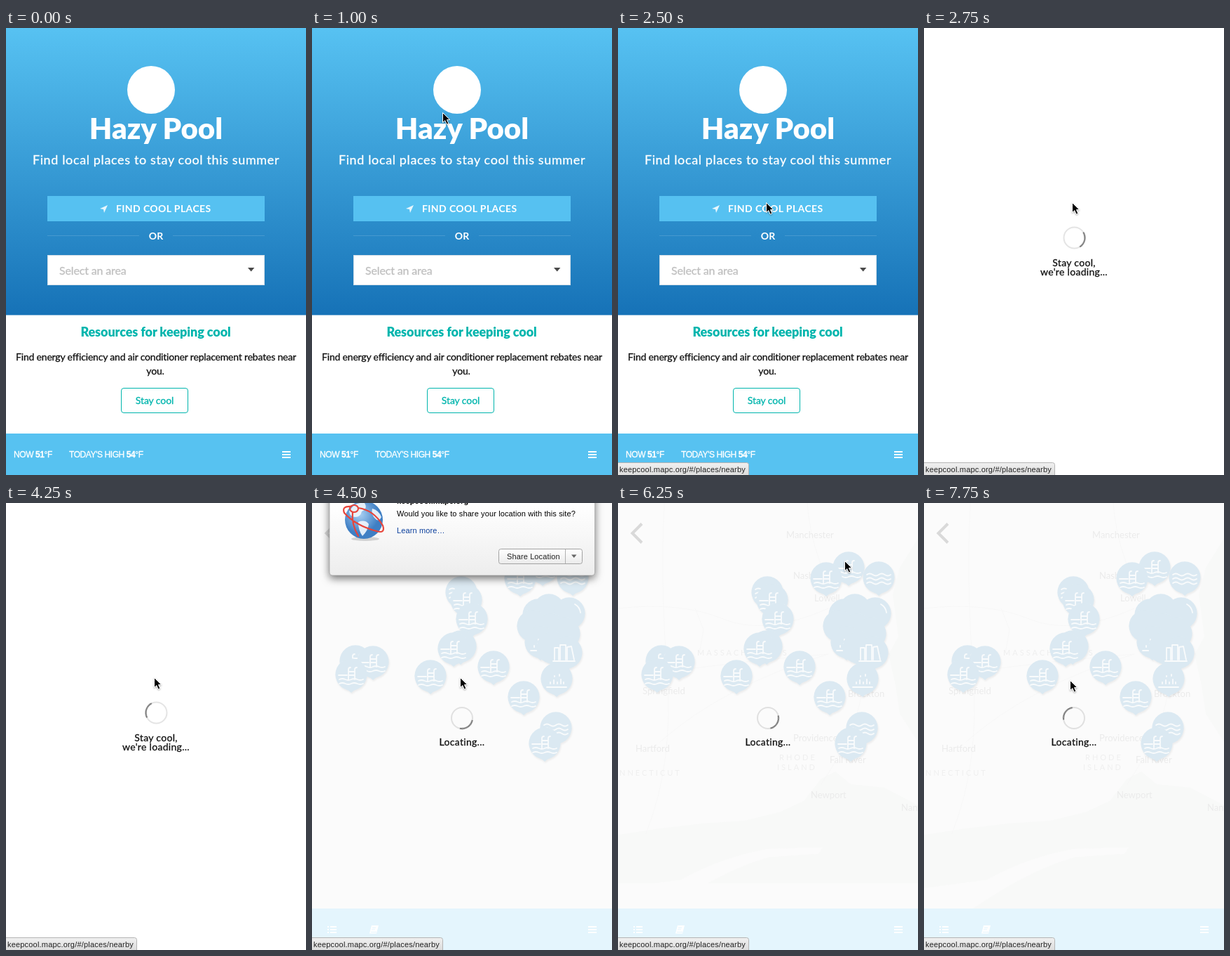
Animation, 428 px wide and 636 px high, one loop 8000 ms. Source, as an HTML page:

```html
<!DOCTYPE html>
<html lang="en">
<head>
<meta charset="utf-8">
<title>Cool places</title>
<style>
html, body { margin: 0; width: 100%; height: 100%; overflow: hidden; background: #fff; }
svg { display: block; width: 428px; height: 636px; font: 14px Lato, "Open Sans", sans-serif; }
.mid { text-anchor: middle; }
.bold { font-weight: 700; }
.black { font-weight: 900; }
.white { fill: #fff; stroke: #fff; }
.teal { fill: #00b5ad; stroke: #00b5ad; }
.ink { fill: #111; stroke: #111; }
.pale { fill: #bfbfbf; stroke: #bfbfbf; }
.thick { stroke-width: .3px; }
.ui { font-family: "Liberation Sans", Arial, sans-serif; font-size: 11px; letter-spacing: .12px; }
.temp { font-family: "Liberation Sans", Arial, sans-serif; font-size: 12px; letter-spacing: -.42px; }
.line { fill: none; stroke-linecap: round; stroke-linejoin: round; }
.place { font-size: 13px; fill: #ebebeb; }
.state { font-size: 11px; letter-spacing: 3px; fill: #efefef; }
.wait { letter-spacing: .3px; }

.home, .loading, .locating, .prompt, .status, .tiles, .strip, .cursor {
  animation: home 8s step-end -20ms infinite;
}
.loading { animation-name: loading; }
.locating { animation-name: locating; }
.prompt { animation-name: prompt; }
.status { animation-name: status; }
.tiles { animation-name: tiles; }
.strip { animation-name: strip; }
.cursor { animation-name: cursor; }
.arc { animation: spin 8s steps(32) -20ms infinite; }

@keyframes home { 0% { opacity: 1 } 34.375%, 100% { opacity: 0 } }
@keyframes loading { 0% { opacity: 0 } 34.375% { opacity: 1 } 56.25%, 100% { opacity: 0 } }
@keyframes locating { 0% { opacity: 0 } 56.25%, 100% { opacity: 1 } }
@keyframes prompt { 0% { opacity: 1 } 71.875%, 100% { opacity: 0 } }
@keyframes status { 0% { opacity: 0 } 31.25%, 100% { opacity: 1 } }
@keyframes tiles { 0% { opacity: 0 } 71.875% { opacity: .5 } 75% { opacity: .8 } 78.125%, 100% { opacity: 1 } }
@keyframes strip { 0% { opacity: 1 } 87.5%, 100% { opacity: 0 } }
@keyframes spin { from { transform: rotate(var(--a)) } to { transform: rotate(calc(var(--a) + 4824deg)) } }
@keyframes cursor {
  0% { transform: translate(-40px, 0) }
  9.375% { transform: translate(163px, 57px) }
  12.5% { transform: translate(186px, 120px) }
  15.625% { transform: translate(212px, 190px) }
  18.75% { transform: translate(229px, 252px) }
  25% { transform: translate(216px, 239px) }
  28.125% { transform: translate(212px, 246px) }
  31.25% { transform: translate(211px, 248px) }
  59.375% { transform: translate(220px, 232px) }
  62.5% { transform: translate(262px, 160px) }
  65.625% { transform: translate(305px, 95px) }
  68.75% { transform: translate(320px, 84px) }
  71.875% { transform: translate(323px, 82px) }
  84.375% { transform: translate(310px, 110px) }
  87.5% { transform: translate(270px, 180px) }
  90.625% { transform: translate(225px, 240px) }
  93.75% { transform: translate(210px, 250px) }
  96.875%, 100% { transform: translate(208px, 252px) }
}
</style>
</head>
<body>
<svg viewBox="0 0 428 636">
  <defs>
    <linearGradient id="sky" x2="0" y2="1"><stop stop-color="#57c2f2"/><stop offset="1" stop-color="#1672b7"/></linearGradient>
    <linearGradient id="sheet" x2="0" y2="1"><stop offset=".3" stop-color="#fff"/><stop offset="1" stop-color="#ededed"/></linearGradient>
    <linearGradient id="key" x2="0" y2="1"><stop stop-color="#fff"/><stop offset="1" stop-color="#ebebeb"/></linearGradient>
    <linearGradient id="tip" x2="0" y2="1"><stop stop-color="#f0f0f0"/><stop offset="1" stop-color="#dcdcdc"/></linearGradient>
    <radialGradient id="sea" cx=".4" cy=".35"><stop stop-color="#a9d0f3"/><stop offset="1" stop-color="#3f7fc4"/></radialGradient>
    <path id="menu" d="M394 602h12v2h-12zM394 606h12v2h-12zM394 610h12v2h-12z" fill="#fff"/>
    <path id="pin" d="M-10 20.2A22.6 22.6 0 1 1 10 20.2Q4 22 0 26Q-4 22-10 20.2Z" fill="#dbe9f2"/>
  </defs>

  <g class="home">
    <rect width="428" height="636" fill="#fff"/>
    <rect width="428" height="408.500" fill="url(#sky)"/>
    <circle cx="207" cy="88" r="34" fill="#fff"/>
    <g fill="#fff" class="mid">
      <text x="214" y="158" class="black" font-size="42">Hazy Pool</text>
      <text x="214" y="194" font-size="18" letter-spacing=".63" class="white thick">Find local places to stay cool this summer</text>
    </g>
    <rect x="59" y="239" width="310" height="36" fill="#56c1f1"/>
    <path d="M145 252l-5 11-1-5-5-1z" fill="#fff" opacity=".85"/>
    <text x="157" y="262" class="bold" letter-spacing=".4" fill="#fff">FIND COOL PLACES</text>
    <path d="M59 295.5H190M238 295.5H369" stroke="#fff" stroke-opacity=".14"/>
    <text x="214" y="301" class="mid bold" fill="#fff">OR</text>
    <rect x="59.5" y="323.5" width="309" height="42" fill="#fff" stroke="#d5dfe7"/>
    <text x="76" y="351" font-size="16" letter-spacing="-.15" class="pale thick">Select an area</text>
    <path d="M345 341h9.4l-4.7 5.4z" fill="#4a4a4a"/>

    <text x="213.5" y="439" class="mid black" font-size="18" letter-spacing="-.1" fill="#00b5ad">Resources for keeping cool</text>
    <g class="mid ink thick" letter-spacing="-.19">
      <text x="214" y="473">Find energy efficiency and air conditioner replacement rebates near</text>
      <text x="213" y="493">you.</text>
    </g>
    <rect x="164.5" y="512.5" width="95" height="35" rx="3.5" fill="none" stroke="#00b5ad"/>
    <text x="212" y="535" class="mid teal thick" letter-spacing="-.1">Stay cool</text>

    <rect y="577" width="428" height="59" fill="#57c2f1"/>
    <g class="temp white thick">
      <text x="11" y="611">NOW <tspan class="bold">51</tspan>°F</text>
      <text x="90" y="611">TODAY'S HIGH <tspan class="bold">54</tspan>°F</text>
    </g>
    <use href="#menu"/>
  </g>

  <g class="loading">
    <rect width="428" height="636" fill="#fff"/>
    <g transform="translate(214.5 298.5)" fill="none" stroke-width="2">
      <circle r="15" stroke="#e4e4e4"/>
      <circle r="15" class="arc" style="--a:110deg" stroke="#767676" stroke-dasharray="23.56 100"/>
    </g>
    <g class="mid wait ink thick">
      <text x="214" y="339">Stay cool,</text>
      <text x="214" y="352">we're loading...</text>
    </g>
  </g>

  <g class="locating">
    <rect width="428" height="636" fill="#fbfbfb"/>
    <g class="tiles">
      <path fill="#f8f9f8" d="M428 50L402 92 392 130 400 190 386 215 396 260 402 300 428 340zM0 472L60 463 120 456 180 452 230 440 265 424 290 392 310 382 332 400 380 405 428 430V577H0z"/>
      <path fill="#fbfbfb" d="M0 548L90 536Q150 503 215 492L292 490 286 499 215 504Q150 522 70 577H0z"/>
      <path class="line" stroke="#f7f7f7" d="M0 150Q90 140 150 165T300 150M66 0Q60 110 70 240T40 470M70 240Q180 225 300 215M60 340Q150 260 300 215M270 0Q275 80 330 170T290 400M110 150l12 30-6 34"/>
      <g class="place">
        <text x="240" y="50">Manchester</text>
        <text x="250" y="108">Nashua</text>
        <text x="280" y="140">Lowell</text>
        <text x="35" y="272">Springfield</text>
        <text x="328" y="276">Brockton</text>
        <text x="250" y="339">Providence</text>
        <text x="25" y="354">Hartford</text>
        <text x="302" y="370">Fall River</text>
        <text x="275" y="420">Newport</text>
        <text x="404" y="438">Nantucket</text>
      </g>
      <g class="state">
        <text x="113" y="217">MASSACHUSETTS</text>
        <text x="230" y="366">RHODE</text>
        <text x="227" y="380">ISLAND</text>
        <text x="-20" y="388">CONNECTICUT</text>
      </g>
      <rect class="strip" y="541" width="428" height="36" fill="#fbfbfb"/>
    </g>
    <g id="pins" style="filter:drop-shadow(1px 2px 1px rgba(0,0,0,.06))"></g>
    <path d="M34 29.500L20.500 43 34 56.500" fill="none" stroke="#d9d9d9" stroke-width="4"/>

    <rect y="577" width="428" height="59" fill="#e4f5fd"/>
    <path d="M22 602h2v2h-2zM22 606h2v2h-2zM22 610h2v2h-2zM26 602h9v2h-9zM26 606h9v2h-9zM26 610h9v2h-9zM85 601h10l-3 11.500H82z" fill="#fff"/>
    <path d="M86 604.500h5M85 607h5M84 610.500h8" stroke="#e4f5fd"/>
    <use href="#menu"/>

    <g transform="translate(214 306)" fill="none" stroke-width="2">
      <circle r="15" stroke="#e0e0e0"/>
      <circle r="15" class="arc" style="--a:-182.5deg" stroke="#767676" stroke-dasharray="23.56 100"/>
    </g>
    <text x="214" y="345" class="mid wait ink thick">Locating...</text>

    <g class="prompt">
      <rect x="25" y="-40" width="378.500" height="143" rx="4" fill="url(#sheet)" stroke="#999" stroke-width=".6" style="filter:drop-shadow(0 4px 6px rgba(0,0,0,.55))"/>
      <ellipse cx="76" cy="51" rx="20" ry="3" fill="#000" opacity=".15"/>
      <circle cx="74" cy="24" r="27" fill="url(#sea)"/>
      <path d="M53 12q8-14 22-12 5 8-4 12-2 8-9 8-8 0-9-8zM66 27q10-4 15 3-1 9-9 17-6-8-6-20zM86 8q9 2 13 12-4 8-9 2-6-6-4-14z" fill="#f3f9fe" opacity=".9"/>
      <path class="line" d="M54 8a6 5 0 1 1 12 0a6 5 0 1 1-12 0M66 7Q88 10 101 32 105 44 92 40 62 32 46 14 42 4 56 5M58 13Q56 30 66 47" stroke="#e8443a" stroke-width="2.2"/>
      <g class="ui">
        <text x="121" y="1" class="bold">keepcool.mapc.org</text>
        <text x="121" y="19">Would you like to share your location with this site?</text>
        <text x="121" y="43" fill="#0b3f9c">Learn more…</text>
        <rect x="266.500" y="65.500" width="119" height="21" rx="3" fill="url(#key)" stroke="#a3a3a3"/>
        <path d="M361.500 66v20" stroke="#b0b0b0"/>
        <text x="278" y="80" fill="#222">Share Location</text>
        <path d="M370 73.500h7.500l-3.750 4.500z" fill="#666"/>
      </g>
    </g>
  </g>

  <g class="status">
    <path d="M-1 618.500H183.500q3 0 3 3V637H-1z" fill="url(#tip)" stroke="#b4b4b4"/>
    <text x="2" y="632" class="ui" style="letter-spacing:.19px" fill="#222">keepcool.mapc.org/#/places/nearby</text>
  </g>

  <g class="cursor">
    <path d="M.5 .5V14.600L3.800 11.600 6.200 17 8.800 15.900 6.500 10.600H10.800z" fill="#000" stroke="#fff" style="filter:drop-shadow(0 1px 1px rgba(0,0,0,.35))"/>
  </g>
</svg>
<script>
const wave = (y, rise = 3) => `M-17 ${y}` + `q4.200-${rise} 8.500 0t8.500 0 8.500 0 8.500 0`;
const glyphs = {
  pool: `M-18 1H-6M-4 7V-7q0-3 3-3M5 7V-7q0-3 3-3M-4-4H5M-4 1H5${wave(7, 2)}${wave(13, 2)}`,
  waves: wave(-4) + wave(2) + wave(8),
  fountain: 'M-14 12H14M-9 7v-2M-4 7v-5M1 7v-2M6 7v-6M10 7v-2M-3-3v-1M4-4v-2',
  books: 'M-17 10V-7h6V10M-9 10V-11h8V10M1 10V-8l6-1 4 19M-19 12H12',
  gleam: 'M8-13q7 4 8 12'
};
// Northern pins first, so southern ones overlap them
const pins = [
  [329, 92, 'pool'], [372, 106, 'waves'], [297, 107, 'pool'], [213, 127, 'waves'],
  [220, 138, 'pool'], [338, 152], [367, 157, 'gleam'], [323, 159], [228, 165, 'pool'],
  [315, 175], [340, 180], [360, 186], [326, 198, 'fountain'], [343, 206],
  [212, 204], [202, 207, 'pool'], [363, 213, 'books'], [62, 225, 'pool'],
  [87, 226, 'pool'], [259, 233, 'pool'], [56, 244, 'pool'], [169, 246, 'pool'],
  [349, 250, 'fountain'], [302, 276, 'pool'], [348, 320, 'waves'], [332, 342, 'pool']
];
document.getElementById('pins').innerHTML = pins.map(([x, y, kind]) =>
  `<g transform="translate(${x} ${y})"><use href="#pin"/>` +
  (kind ? `<path class="line" d="${glyphs[kind]}" stroke="#f9fbfc" stroke-width="1.8"/>` : '') +
  '</g>').join('');
</script>
</body>
</html>
```
